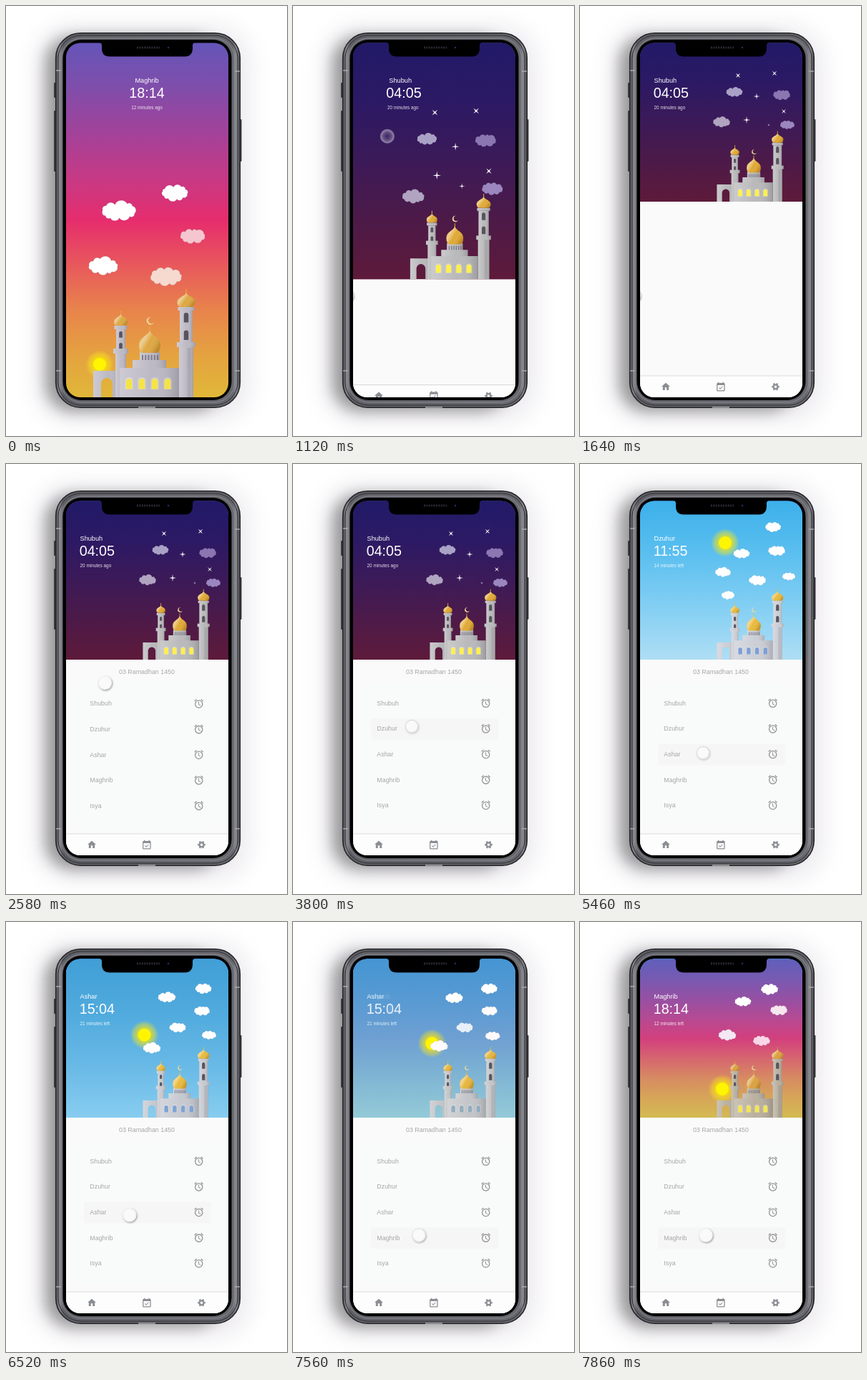
An HTML page that plays this animation: 393 px wide and 600 px high, repeating every 8 s.

```html
<!DOCTYPE html>
<html lang="en">
<head>
<meta charset="utf-8">
<title>Prayer times</title>
<style>
  html, body { margin: 0; width: 100%; height: 100%; overflow: hidden; background: #fff; }
  svg { display: block; width: 100vw; height: 100vh; }
  text { font-family: "Liberation Sans", Arial, sans-serif; }
  .list text { font-size: 8.9px; fill: #a6a6a6; }
  .clock text { fill: #fff; }
</style>
</head>
<body>
<svg id="stage" viewBox="0 0 393 600">
  <defs>
    <clipPath id="screen"><rect x="84" y="51.5" width="227" height="494.5" rx="20"/></clipPath>
    <filter id="soft" x="-40%" y="-20%" width="180%" height="140%"><feGaussianBlur stdDeviation="10"/></filter>
    <filter id="wide" x="-40%" y="-20%" width="180%" height="140%"><feGaussianBlur stdDeviation="15"/></filter>
    <filter id="drop" x="-50%" y="-50%" width="200%" height="200%"><feGaussianBlur stdDeviation="1"/></filter>
    <linearGradient id="shade">
      <stop offset="0" stop-color="#fff" stop-opacity=".25"/>
      <stop offset=".55" stop-color="#fff" stop-opacity="0"/>
      <stop offset="1" stop-color="#000" stop-opacity=".16"/>
    </linearGradient>
    <linearGradient id="gloss" x2="1" y2=".6">
      <stop offset="0" stop-color="#fff" stop-opacity="0"/>
      <stop offset=".35" stop-color="#fff" stop-opacity=".45"/>
      <stop offset=".6" stop-color="#fff" stop-opacity="0"/>
      <stop offset="1" stop-color="#7a4a00" stop-opacity=".3"/>
    </linearGradient>
    <linearGradient id="metal">
      <stop offset="0" stop-color="#55555b"/><stop offset=".02" stop-color="#8b8b92"/>
      <stop offset=".04" stop-color="#5f5f66"/><stop offset=".96" stop-color="#66666d"/>
      <stop offset=".98" stop-color="#8b8b92"/><stop offset="1" stop-color="#4d4d53"/>
    </linearGradient>
    <radialGradient id="halo">
      <stop offset=".4" stop-color="#ffe900" stop-opacity=".75"/>
      <stop offset=".75" stop-color="#f8e61a" stop-opacity=".4"/>
      <stop offset="1" stop-color="#f8e61a" stop-opacity="0"/>
    </radialGradient>
    <radialGradient id="lunar">
      <stop offset="0" stop-color="#fff" stop-opacity=".1"/>
      <stop offset=".3" stop-color="#fff" stop-opacity=".35"/>
      <stop offset=".6" stop-color="#fff" stop-opacity=".6"/>
      <stop offset=".8" stop-color="#fff"/><stop offset="1" stop-color="#fff"/>
    </radialGradient>
  </defs>

  <rect x="42" y="28" width="300" height="552" rx="50" fill="#a79cae" opacity=".2" filter="url(#wide)"/>
  <rect x="55" y="42" width="245" height="524" rx="38" fill="#555" opacity=".55" filter="url(#soft)"/>
  <g fill="#3a3a3f">
    <rect x="67" y="107" width="4" height="21" rx="1"/><rect x="67" y="146" width="4" height="49" rx="1"/>
    <rect x="67" y="181" width="4" height="50" rx="1"/><rect x="326" y="158" width="3.5" height="59" rx="1"/>
  </g>
  <rect x="69.7" y="37.7" width="257.6" height="522.6" rx="35" fill="url(#metal)" stroke="#252528" stroke-width="1.6"/>
  <rect x="73" y="41" width="251" height="516" rx="32" fill="none" stroke="#2c2c30" stroke-width="1"/>
  <rect x="77" y="45" width="243" height="508" rx="29" fill="none" stroke="#8a8a92" stroke-width="1"/>
  <path d="M70 90h7M320 91h7M70 509h7M320 509h7M185 560h24" stroke="#aaa" stroke-width="1.4"/>
  <rect x="79.5" y="47" width="236" height="503" rx="26" fill="#000"/>

  <g clip-path="url(#screen)">
    <g id="skies"></g>
    <g id="stars" fill="#fff"></g>
    <circle id="moon" r="10" fill="url(#lunar)"/>
    <g id="sun"><circle r="20" fill="url(#halo)"/><circle r="9" fill="#fff500"/></g>
    <g id="clouds" stroke="#5a466e" stroke-opacity=".22" stroke-width="1.2"></g>
    <g id="mosque"></g>
    <g id="clock" class="clock"></g>
    <g id="sheet">
      <rect x="84" y="273" width="227" height="280" fill="#fafafa"/>
      <g id="list" class="list"></g>
    </g>
    <g id="nav" fill="#8b8e93">
      <rect x="84" y="516" width="227" height="40" fill="#fdfdfd"/>
      <path d="M84 516h227" stroke="#dfdbdc" stroke-width="1.2"/>
      <path transform="translate(112.8 523.9) scale(.6)" d="M10 20v-6h4v6h5v-8h3L12 3 2 12h3v8z"/>
      <path transform="translate(189.2 524) scale(.64)" d="M16.53 11.06L15.47 10l-4.88 4.88-2.12-2.12-1.06 1.06L10.59 17l5.94-5.94zM19 3h-1V1h-2v2H8V1H6v2H5c-1.11 0-1.99.9-1.99 2L3 19c0 1.1.89 2 2 2h14c1.1 0 2-.9 2-2V5c0-1.1-.9-2-2-2zm0 16H5V8h14v11z"/>
      <g transform="translate(273.5 531.3)" fill="none" stroke="#8b8e93">
        <circle r="2.9" stroke-width="2.2"/>
        <circle r="4.5" stroke-width="1.8" pathLength="12" stroke-dasharray="1 1" stroke-dashoffset=".5"/>
      </g>
    </g>
    <g id="cursor">
      <circle id="cast" cx="1" cy="1.2" r="10" fill="#555" filter="url(#drop)"/>
      <circle r="9.8" fill="#fafafa"/>
      <circle id="ring" r="9" fill="none" stroke="#d3d3d3" stroke-width="1.2"/>
    </g>
  </g>
  <path d="M130 51q4 0 4 4v4q0 11.500 11 11.500h105q11 0 11-11.500v-4q0-4 4-4z" fill="#000"/>
  <path d="M183 58h32" stroke="#2b2b36" stroke-width="3" stroke-dasharray="2 1.400"/>
  <circle cx="227" cy="58" r="1.300" fill="#2b2b5a"/>
</svg>
<script>
const $ = id => document.getElementById(id);
const LOOP = 8000;
const clamp = v => Math.max(0, Math.min(1, v));
const mix = (a, b, p) => a + (b - a) * p;
const ramp = (t, a, b) => clamp((t - a) / (b - a));
const ease = (t, a, b) => 1 - Math.pow(1 - ramp(t, a, b), 2.5);
const rgb = c => [1, 3, 5].map(i => parseInt(c.slice(i, i + 2), 16));
const blend = (a, b, p) => {
  const y = rgb(b);
  return 'rgb(' + rgb(a).map((v, i) => Math.round(mix(v, y[i], p))) + ')';
};
const add = (parent, tag, attrs, text) => {
  const el = document.createElementNS('http://www.w3.org/2000/svg', tag);
  for (const k in attrs) el.setAttribute(k, attrs[k]);
  if (text) el.textContent = text;
  parent.appendChild(el);
  return el;
};
const place = (el, x, y, s = 1) => el.setAttribute('transform', `translate(${x} ${y}) scale(${s})`);

const sunset = ['#6455b8', '#7f4eab', '#a1429a', '#c53a86', '#e62d6d', '#e8585c', '#e8834c', '#e5a140', '#e0b838'];
const W = '#ffffff';
// Clouds are [x, y, width, colour]; night has a second set for the full-height view.
const scenes = [
  { from: 0, to: 0, cap: 1, sky: sunset, sun: [131, 500],
    wall: '#bdb9c4', glass: '#f5e444', gold: '#dda63f',
    text: ['Maghrib', '18:14', '12 minutes ago'],
    clouds: [[158, 286, 52, W], [261, 321, 38, '#f5c6cf'], [224, 378, 48, '#f6d9cf'], [136, 363, 45, W], null, [236, 261, 40, W]] },
  { from: 20, to: 740, cap: 1, sky: ['#211a68', '#2c1964', '#3c1a58', '#4d1a48', '#5e1a3a'], sun: [160, 600],
    wall: '#b9b9bb', glass: '#fff04a', gold: '#e0a832',
    text: ['Shubuh', '04:05', '20 minutes ago'],
    clouds: [[216, 120, 25, '#aaa2c6'], [282, 124, 26, '#8c76b2'], [290, 166, 22, '#9b86bf'], [198, 162, 26, '#b0a4c0']],
    tall: [[144, 285, 38], [250, 284, 41], [262, 391, 47], [123, 424, 46]] },
  { from: 3800, to: 4420, cap: 1, sky: ['#3cb0ea', '#5bbfef', '#83cff3', '#b0def5'], sun: [203, 110],
    wall: '#ccced6', glass: '#7d9fd6', gold: '#e8b93a',
    text: ['Dzuhur', '11:55', '14 minutes left'],
    clouds: [[226, 125, 25, W], [275, 121, 26, W], [292, 157, 20, W], [200, 151, 24, W], [248, 162, 26, W], [270, 88, 24, W], [207, 183, 20, W]] },
  { from: 5660, to: 6460, cap: 1, sky: ['#409fd6', '#50aadd', '#68b9e6', '#88cdf0'], sun: [193.5, 157.5],
    wall: '#c6c9d0', glass: '#7fa3d4', gold: '#e8b93a',
    text: ['Ashar', '15:04', '21 minutes left'],
    clouds: [[225, 105, 27, W], [274, 124, 24, W], [284, 158, 22, W], [204, 176, 27, W], [240, 147, 25, W], [276, 93, 25, W]] },
  { from: 7540, to: 7860, cap: .86, sky: sunset, sun: [199, 233],
    wall: '#b9b09f', glass: '#f5e650', gold: '#dba03c',
    text: ['Maghrib', '18:14', '12 minutes left'],
    clouds: [[228, 111, 25, W], [278, 123, 26, '#f7e6ee'], [254, 166, 26, '#f8d8e8'], [206, 158, 27, '#f5e8f2'], null, [265, 94, 26, W]] }
];

// Skies and clock texts
const lines = [[9.2, 107, 103.5], [19.7, 127.5, 102.7], [6.4, 144.4, 103.5]];
scenes.forEach((s, i) => {
  const g = add(document.querySelector('defs'), 'linearGradient', { id: 'sky' + i, x2: 0, y2: 1 });
  s.sky.forEach((c, k) => add(g, 'stop', { offset: k / (s.sky.length - 1), 'stop-color': c }));
  s.rect = add($('skies'), 'rect', { x: 84, y: 51, width: 227, fill: `url(#sky${i})` });
  s.label = add($('clock'), 'g', {});
  s.rows = lines.map(([size, y, x], k) => {
    const el = add(s.label, 'text', { y, 'font-size': size, opacity: k == 2 ? .85 : 1 }, s.text[k]);
    return { el, x, w: el.getComputedTextLength() };
  });
});

// Stars: full-height x, y, then card x, y, radius, turn
const stars = [
  [164, 227, 221, 97, 4.5, 45], [232, 226, 272, 94, 4.5, 45], [197, 303, 247, 126, 4.5, 0],
  [257, 357, 285, 147, 4.2, 45], [153, 354, 233, 159, 5, 0], [194, 381, 264, 166, 2, 0]
].map(v => ({ v, el: add($('stars'), 'path', { d: 'M0-1L.14-.14 1 0 .14.14 0 1-.14.14-1 0-.14-.14z' }) }));

// Bumpy outline, 100 units wide
function puff(seed) {
  const rnd = () => (seed = (seed * 16807) % 2147483647) / 2147483647;
  const n = 10, tall = 20 + rnd() * 6, pts = [];
  for (let k = 0; k < n; k++) {
    const a = (k + rnd() * .5) / n * 2 * Math.PI;
    pts.push([44 * Math.cos(a), tall * Math.sin(a) * (.85 + rnd() * .3)]);
  }
  return pts.reduce((d, p, k) => {
    const q = pts[(k + 1) % n], r = Math.hypot(q[0] - p[0], q[1] - p[1]) * .56;
    return d + `A${r} ${r} 0 0 1 ${q}`;
  }, 'M' + pts[0]) + 'z';
}
const puffs = [...Array(7).keys()].map(i => add($('clouds'), 'path', { d: puff(91 + i * 7717) }));

// Mosque
const box = (x, y, w, h) => `M${x} ${y}h${w}v${h}h${-w}z`;
const arch = (x, y, w, h) => `M${x - w / 2} ${y + h}V${y + w / 2}a${w / 2} ${w / 2} 0 0 1 ${w} 0V${y + h}z`;
const onion = (x, t, b, w) => {
  const h = b - t, r = w / 2;
  return `M${x} ${t}C${x + 1} ${t + h * .25} ${x + r} ${t + h * .3} ${x + r} ${t + h * .65}Q${x + r} ${b - 2} ${x + r * .7} ${b}` +
    `H${x - r * .7}Q${x - r} ${b - 2} ${x - r} ${t + h * .65}C${x - r} ${t + h * .3} ${x - 1} ${t + h * .25} ${x} ${t}z`;
};
const mosque = $('mosque');
const part = (d, fill = 'var(--wall)', over = 'url(#shade)') => [fill, over].forEach(f =>
  add(mosque, 'path', { d, fill: f, 'fill-rule': 'evenodd' }));
const dome = (x, t, b, w) => {
  add(mosque, 'path', { d: `M${x} ${t - 5}V${t + 4}`, stroke: 'var(--gold)', 'stroke-width': 1.3 });
  part(onion(x, t, b, w), 'var(--gold)', 'url(#gloss)');
};
const tower = (x, top, w, ledge, base) => {
  part(box(x - w / 2, top + 5, w, ledge - top));
  part(box(x - w / 2 - 2.5, top, w + 5, 5));
  const gap = (ledge - top) / 2;
  for (const k of [0, 1])
    add(mosque, 'path', { d: arch(x, top + 8 + k * gap, w * .36, gap * .55), fill: '#57545e' });
  part(box(x - w / 2 - 1, ledge + 6, w + 2, base - ledge - 6));
  part(box(x - w / 2 - 4, ledge, w + 8, 7));
};
part(box(122, 509, 38, 37) + arch(141, 519, 16, 28));
tower(160.5, 446, 13, 478, 546);
dome(160.5, 430, 446, 19);
tower(252, 420, 18, 469, 546);
dome(252, 400, 420, 25);
part(box(187, 482, 28, 14));
add(mosque, 'path', { d: 'M190 491H213', stroke: '#5c5a70', 'stroke-width': 8, 'stroke-dasharray': '2 2.2', opacity: .65 });
dome(201, 452, 484, 30);
add(mosque, 'path', { d: 'M203 434a5.400 5.400 0 1 0 4 7.500a4.600 4.600 0 1 1 -4-7.500z', fill: '#ecd79c' });
part(box(177, 494, 47, 13));
part(box(159, 505, 83, 41));
for (let i = 0; i < 4; i++) {
  const x = 172 + i * 18;
  add(mosque, 'path', { d: arch(x, 518, 11, 17), fill: '#fff', opacity: .3 });
  add(mosque, 'path', { d: arch(x, 520, 8.4, 14.5), fill: 'var(--glass)' });
}
add(mosque, 'path', { d: 'M256 477V546', stroke: '#000', 'stroke-width': 5, opacity: .08 });

// Prayer list
const list = $('list');
const alarm = 'M22 5.720l-4.600-3.860-1.290 1.530 4.600 3.860zM7.880 3.390L6.600 1.860 2 5.710l1.290 1.530zM12.500 8H11v6l4.750 2.850.750-1.230-4-2.370zM12 4a9 9 0 1 0 0 18a9 9 0 0 0 0-18zm0 16a7 7 0 1 1 0-14a7 7 0 0 1 0 14z';
add(list, 'text', { x: 197, y: 292.7, 'text-anchor': 'middle' }, '03 Ramadhan 1450');
add(list, 'rect', { x: 93, y: 307, width: 208, height: 198, rx: 14, fill: '#f9fbfa' });
const rows = ['Shubuh', 'Dzuhur', 'Ashar', 'Maghrib', 'Isya'].map((name, i) => {
  const y = 333.7 + i * 35.6;
  const bar = add(list, 'rect', { x: 109, y: y - 14.5, width: 178, height: 30, rx: 3, fill: '#f6f6f6' });
  add(list, 'text', { x: 117.3, y: y + 3 }, name);
  add(list, 'path', { d: alarm, fill: '#929292', transform: `translate(262 ${y - 7.7}) scale(.64)` });
  return bar;
});

// Cursor legs: start, end, x, y
const legs = [[1940, 2740, 139.5, 303.5], [2780, 3520, 166, 366], [4500, 5220, 172, 403], [6470, 7180, 176, 437]];
const presses = [[3640, 3940], [5440, 5660], [7320, 7500]];
// Highlighted row: index, fade-in time, fade-out time
const hovers = [[1, 3050, 4620], [2, 4700, 6620], [3, 6680, 9000]];

function drawScene(t, p) {
  const amounts = scenes.map((s, i) => i ? ease(t, s.from, s.to) : 1);
  let n = 0;
  amounts.forEach((a, i) => { if (a > 0) n = i; });
  const b = scenes[n], a = scenes[Math.max(0, n - 1)], e = amounts[n];
  const low = mix(546, 273, p), shrink = mix(1, .652, p);

  scenes.forEach((s, i) => {
    s.rect.setAttribute('height', low - 50);
    s.rect.setAttribute('opacity', amounts[i] * s.cap);
    s.label.setAttribute('opacity', amounts[i] * (1 - (amounts[i + 1] || 0)));
    s.rows.forEach(r => r.el.setAttribute('x', mix(197 - r.w / 2, r.x, p)));
  });

  const cloud = (s, i) => {
    const c = s.clouds[i], f = s.tall && s.tall[i];
    return c && f ? [0, 1, 2].map(k => mix(f[k], c[k], p)).concat(c[3]) : c;
  };
  puffs.forEach((el, i) => {
    const from = cloud(a, i), to = cloud(b, i), u = from || to, v = to || from;
    el.setAttribute('opacity', mix(from ? 1 : 0, to ? 1 : 0, e));
    if (!u) return;
    place(el, mix(u[0], v[0], e), mix(u[1], v[1], e), mix(u[2], v[2], e) / 100);
    el.setAttribute('fill', blend(u[3], v[3], e));
  });

  for (const k of ['wall', 'glass', 'gold']) mosque.style.setProperty('--' + k, blend(a[k], b[k], e));
  place(mosque, mix(122, 191.5, p) - 122 * shrink, low - 546 * shrink, shrink);
  place($('sun'), mix(a.sun[0], b.sun[0], e), mix(a.sun[1], b.sun[1], e));

  const night = amounts[1] * (1 - amounts[2]);
  $('stars').setAttribute('opacity', night);
  stars.forEach(({ v, el }) => {
    const r = mix(7, v[4], p);
    el.setAttribute('transform', `translate(${mix(v[0], v[2], p)} ${mix(v[1], v[3], p)}) rotate(${v[5]}) scale(${r})`);
  });
  place($('moon'), mix(150, 120, p), mix(230, 150, p) + 70 * (1 - amounts[1]));
  $('moon').setAttribute('opacity', night * (1 - p));
}

function draw(t) {
  const p = ease(t, 880, 1660);
  drawScene(t, p);
  place($('sheet'), 0, 273 * (1 - p));
  place($('nav'), 0, 32 * (1 - p));

  const shown = ease(t, 1940, 2740);
  list.setAttribute('opacity', shown);
  place(list, 0, 40 * (1 - shown));
  rows.forEach((bar, i) => {
    const h = hovers.find(v => v[0] == i);
    bar.setAttribute('opacity', h ? ramp(t, h[1], h[1] + 200) * (1 - ramp(t, h[2], h[2] + 200)) : 0);
  });

  let x = 75, y = 404;
  for (const [from, to, lx, ly] of legs) {
    const e = ease(t, from, to);
    x = mix(x, lx, e);
    y = mix(y, ly, e);
  }
  const press = Math.max(...presses.map(([a, b]) => ramp(t, a - 40, a + 20) * (1 - ramp(t, b, b + 100))));
  place($('cursor'), x, y, mix(1, .96, press));
  $('cursor').setAttribute('opacity', ramp(t, 1060, 1110));
  $('cast').setAttribute('opacity', mix(.5, .25, press));
  $('ring').setAttribute('opacity', mix(.25, .8, press));
}

function tick() {
  draw(performance.now() % LOOP);
  requestAnimationFrame(tick);
}
tick();
</script>
</body>
</html>
```
